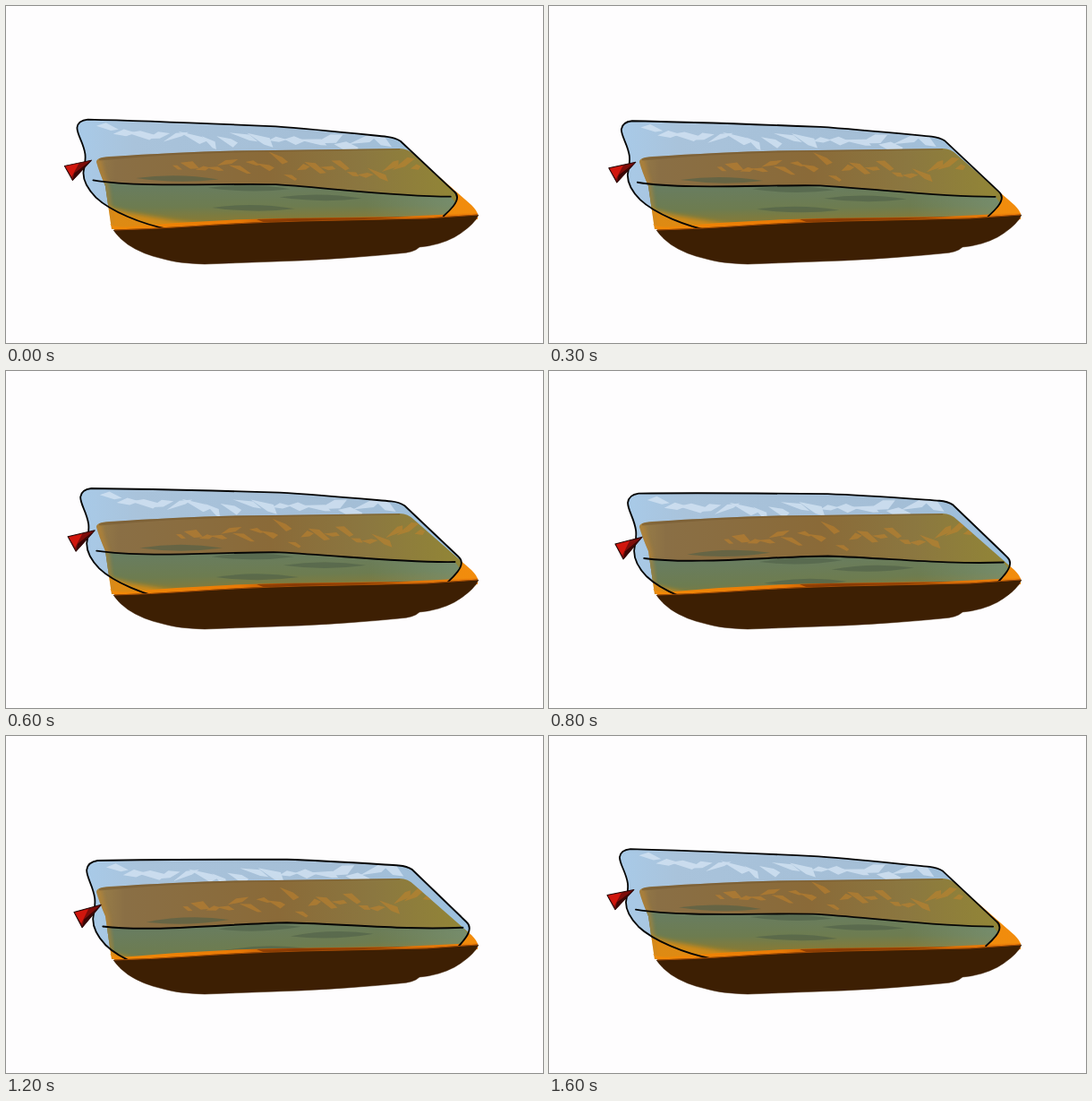
Write an HTML page that moves like this. It is 600x376 px and loops after 1700 ms.

```html
<!DOCTYPE html>
<html lang="en">
<head>
<meta charset="utf-8">
<title>Bag in a tray</title>
<style>
  html, body { margin: 0; width: 100%; height: 100%; overflow: hidden; background: #fefdfe; }
  svg { display: block; width: 100vw; height: 100vh; }
  .line { fill: none; stroke: #050505; stroke-width: 1.8; stroke-linecap: round; stroke-linejoin: round; }
</style>
</head>
<body>
<svg viewBox="0 0 600 376">
  <defs>
    <linearGradient id="wood" x1="0" x2="1">
      <stop offset="0" stop-color="#dc8a14"/><stop offset="1" stop-color="#f28c0c"/>
    </linearGradient>
    <linearGradient id="blue" x1="0" x2="1">
      <stop offset="0" stop-color="#a8cae8"/><stop offset=".15" stop-color="#a9c3db"/>
      <stop offset=".7" stop-color="#a4bed6"/><stop offset="1" stop-color="#9cc0de"/>
    </linearGradient>
    <linearGradient id="back" x1="0" x2="1">
      <stop offset="0" stop-color="#a0854a"/><stop offset=".1" stop-color="#8a6f45"/>
      <stop offset=".5" stop-color="#8a6a38"/><stop offset=".75" stop-color="#8b7740"/><stop offset="1" stop-color="#928636"/>
    </linearGradient>
    <linearGradient id="front" x1="0" x2="0" y1="195" y2="240" gradientUnits="userSpaceOnUse">
      <stop offset="0" stop-color="#687d62"/><stop offset=".6" stop-color="#6d7c50"/><stop offset="1" stop-color="#8a7a32"/>
    </linearGradient>
    <linearGradient id="shine" x1="400" x2="515" y1="0" y2="0" gradientUnits="userSpaceOnUse">
      <stop offset="0" stop-color="#7f9c84" stop-opacity="0"/><stop offset="1" stop-color="#7f9c84" stop-opacity=".6"/>
    </linearGradient>
    <linearGradient id="rim" x1="0" x2="1">
      <stop offset="0" stop-color="#f28a08"/><stop offset=".35" stop-color="#e97a06"/>
      <stop offset=".5" stop-color="#a94a04"/><stop offset=".72" stop-color="#d66a06"/><stop offset="1" stop-color="#ee820a"/>
    </linearGradient>
    <filter id="soft" x="-20%" y="-50%" width="140%" height="200%"><feGaussianBlur stdDeviation="2.5"/></filter>

    <path id="tray" d="M101 174Q101 169 115 168C180 164 240 161 300 161L440 159Q449 159 456 166L520 222Q527 229 527 233V238L300 242L118 249Q113 215 111 201Q104 185 101 174Z"/>
    <path id="bag" d="M182 247C150 241 115 226 99 211C90 202 85 193 85 184C86 176 88 172 87 163C85 150 78 142 78 134Q79 126 90 125C160 127 220 130 300 134C340 137 395 143 424 146Q433 147 439 151L499 207Q506 213 498 223Q494 228 487 234"/>
    <path id="seam" d="M96 192C150 201 240 196 300 198C370 203 430 212 495 212.500"/>
    <clipPath id="inTray"><use href="#tray"/></clipPath>
    <clipPath id="inBag"><use href="#bag"/></clipPath>
  </defs>

  <use href="#tray" fill="url(#wood)"/>

  <!-- bag against the white -->
  <g class="move">
    <use href="#bag" fill="url(#blue)"/>
    <g id="pale" clip-path="url(#inBag)" fill="#d3e3f3" opacity=".8"></g>
  </g>

  <!-- bag against the tray -->
  <g clip-path="url(#inTray)">
    <g class="move"><g clip-path="url(#inBag)">
      <use href="#bag" fill="url(#back)"/>
      <g id="face">
        <path fill="url(#front)" d="M96 192C150 201 240 196 300 198C370 203 430 212 495 212.500L520 245L110 250Z"/>
        <path fill="url(#shine)" d="M400 206Q440 211 495 212.500L520 245H400Z"/>
        <path fill="#d28a16" filter="url(#soft)" d="M106 220L135 228L190 238L230 243L118 252Z"/>
      </g>
      <g id="dark" fill="#4f6048" opacity=".6"></g>
      <g id="warm" fill="#c4832c" opacity=".55"></g>
    </g></g>
    <path d="M103 170Q106 187 112 203L118 249" fill="none" stroke="#c98a2a" stroke-width="5" opacity=".6" filter="url(#soft)"/>
    <path d="M104 171Q200 162 300 161L440 159" fill="none" stroke="#75562c" stroke-width="3" opacity=".5"/>
  </g>

  <path fill="url(#rim)" d="M116 243Q122 248 140 246Q220 239 300 237L440 235L527 231L525 239L300 244L124 253Z"/>
  <path fill="#7d3303" opacity=".7" d="M280 238L455 235L400 238L350 239L292 243Z"/>

  <g class="move">
    <use href="#bag" class="line"/>
    <use href="#seam" class="line"/>
    <path fill="#7d0d0a" stroke="#230504" stroke-linejoin="round" d="M64 176L94 170L73 192Z"/>
    <path fill="#d0160d" d="M65 176.500L80 173.500L72 188Z"/>
    <path fill="#3a0605" d="M94 170L73 192L75 184Z"/>
  </g>

  <path fill="#3d1f03" stroke="#3d1f03" stroke-width=".5" d="M120 250Q160 249 205 246Q260 242 330 240L470 237L528 233Q523 245 501 258Q484 267 462 269Q456 275 440 276Q390 281 330 284L222 288Q192 287 177 282.500Q152 277 136 266Q126 259 120 250Z"/>
  <path fill="none" stroke="#a04a06" d="M121 250Q160 249 205 246Q260 242 330 240L470 237L527 233"/>
</svg>
<script>
const STEP = 100, STEPS = 17;

let seed = 11;
const rand = (a, b) => a + (b - a) * (seed = seed * 16807 % 2147483647) / 2147483647;

function addPath(id, d) {
  const p = document.createElementNS('http://www.w3.org/2000/svg', 'path');
  p.setAttribute('d', d);
  document.getElementById(id).append(p);
  return p;
}

// A slanted splinter, wide at one end
function shard(id, x, y, w, h) {
  const p = addPath(id, `M${-w / 2} 0L${w * rand(-.1, .3)} ${-h / 2}L${w / 2} ${h * rand(-.4, .4)}L${w * rand(0, .4)} ${h / 2}Z`);
  p.setAttribute('transform', `translate(${x} ${y}) rotate(${rand(-30, 35)})`);
}

for (let x = 112; x < 435; x += 19) {
  shard('pale', x, 140 + (x - 112) * .045 + rand(-7, 6), rand(16, 36), rand(6, 13));
}
for (let x = 190; x < 475; x += 14) {
  shard('warm', x, rand(168, 192), rand(12, 28), rand(4, 9));
}
for (let i = 0; i < 4; i++) {
  const x = 190 + i % 3 * 80 + (i > 2 ? 85 : 0), y = 190 + i * 11, w = 46;
  addPath('dark', `M${x - w} ${y}Q${x} ${y - 6} ${x + w} ${y + 2}Q${x} ${y + 7} ${x - w} ${y}Z`);
}

const smooth = (a, b, x) => {
  const t = Math.min(1, Math.max(0, (x - a) / (b - a)));
  return t * t * (3 - 2 * t);
};

// 0 = raised, 1 = settled: a slow slide with a drop in the middle, then a cut back
function settle(step) {
  const u = Math.max(0, (step + 4) % STEPS - 1) / 15;
  return .58 * u + .42 * smooth(.54, .76, u);
}

const moving = document.querySelectorAll('.move');
const start = performance.now();

function tick() {
  const s = settle(Math.floor((performance.now() - start) / STEP));
  const m = [1 + .008 * s, -.053 * s, 0, 1 + .1 * s, 11.5 * s, 6.3 * s];
  for (const g of moving) g.setAttribute('transform', `matrix(${m})`);
  requestAnimationFrame(tick);
}
tick();
</script>
</body>
</html>
```
